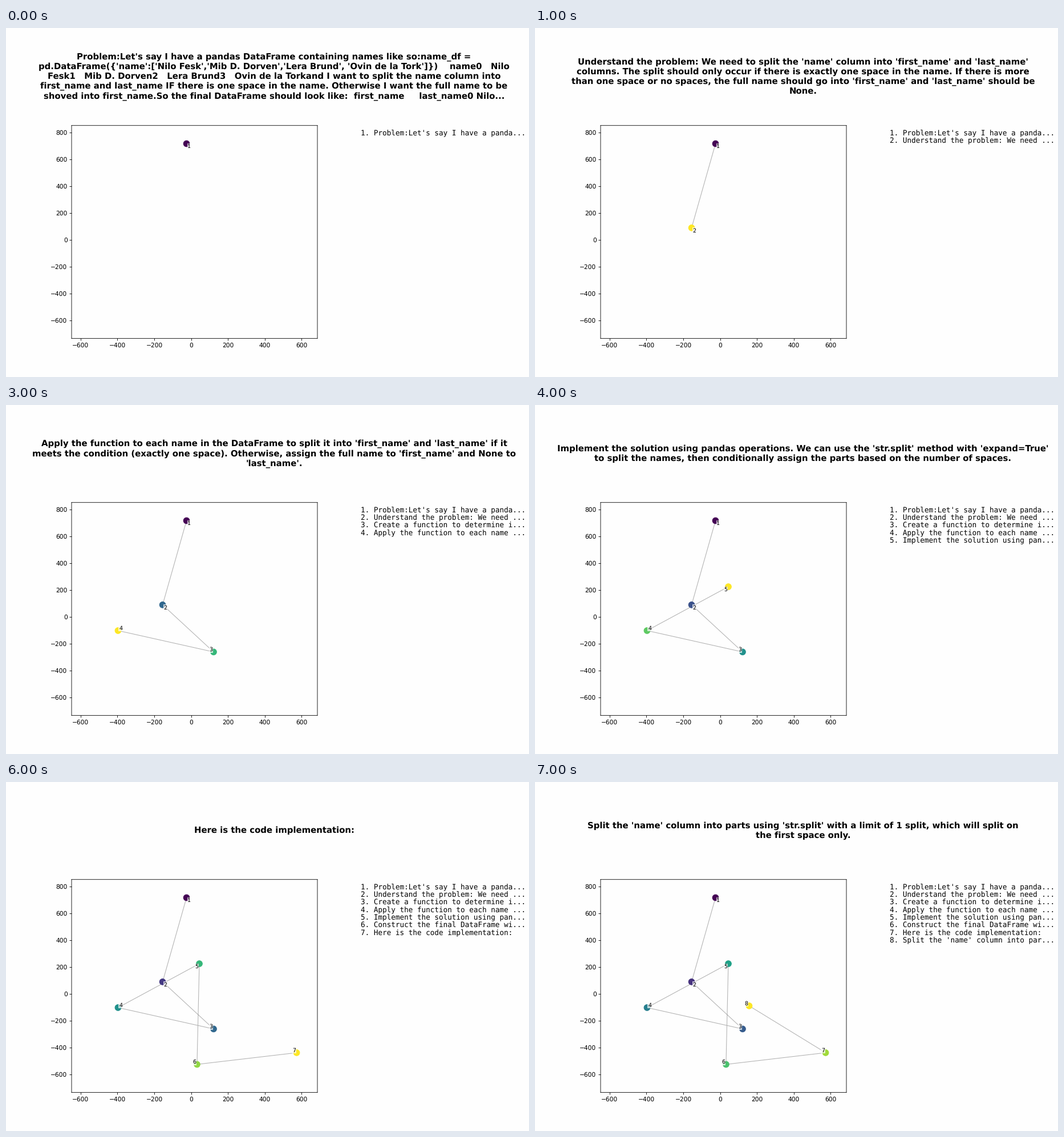
Recreate the animation shown at these times as a matplotlib script. Size 917 by 611 pixels, loop 8000 ms.

```python
import numpy as np
import matplotlib.pyplot as plt
from matplotlib.animation import FuncAnimation

W, H, DPI = 917, 611, 76.375
K = 0.764            # title layout unit in pixels
LEFT, RIGHT, TOP, BOTTOM = 115, 546, 170.7, 543.4
TITLE_X, TITLE_Y = 470, 85.15
LIST_X, LIST_Y, LIST_STEP = 622, 188, 13.33
PAPER = "#fefefe"

TITLES = [
    ["Problem:Let's say I have a pandas DataFrame containing names like so:name_df =",
     "pd.DataFrame({'name':['Nilo Fesk','Mib D. Dorven','Lera Brund', 'Ovin de la Tork']})"
     "    name0   Nilo",
     "Fesk1   Mib D. Dorven2   Lera Brund3   Ovin de la Torkand I want to split the name column into",
     "first_name and last_name IF there is one space in the name. Otherwise I want the full name to be",
     "shoved into first_name.So the final DataFrame should look like:  first_name     last_name0 Nilo..."],
    ["Understand the problem: We need to split the 'name' column into 'first_name' and 'last_name'",
     "columns. The split should only occur if there is exactly one space in the name. If there is more",
     "than one space or no spaces, the full name should go into 'first_name' and 'last_name' should be",
     "None."],
    ["Create a function to determine if a name contains exactly one space. If so, split the name into its",
     "first and last parts. Otherwise, keep the full name."],
    ["Apply the function to each name in the DataFrame to split it into 'first_name' and 'last_name' if it",
     "meets the condition (exactly one space). Otherwise, assign the full name to 'first_name' and None to",
     "'last_name'."],
    ["Implement the solution using pandas operations. We can use the 'str.split' method with 'expand=True'",
     "to split the names, then conditionally assign the parts based on the number of spaces."],
    ["Construct the final DataFrame with 'first_name' and 'last_name' columns as specified."],
    ["Here is the code implementation:"],
    ["Split the 'name' column into parts using 'str.split' with a limit of 1 split, which will split on",
     "the first space only."],
]

POINTS = np.array([(-25, 717), (-155, 90), (122, -261), (-397, -102),
                   (44.6, 225), (32, -525), (573, -438), (157.7, -89)])
# label side of each point: right/left, up/down
SIDES = [(1, -1), (1, -1), (-1, 1), (1, 1), (-1, -1), (-1, 1), (-1, 1), (-1, 1)]

plt.rcParams["font.family"] = "DejaVu Sans"
plt.rcParams["text.hinting"] = "no_hinting"
fig = plt.figure(figsize=(12.00655, 8), dpi=DPI, facecolor=PAPER)
ax = fig.add_axes([LEFT / W, 1 - BOTTOM / H, (RIGHT - LEFT) / W, (BOTTOM - TOP) / H],
                  facecolor=PAPER)
ax.set(xlim=(-649.3, 685.9), ylim=(-733.6, 852.3),
       xticks=range(-600, 601, 200), yticks=range(-600, 801, 200))
for spine in ax.spines.values():
    spine.set_snap(False)

path, = ax.plot([], [], color="black", alpha=0.3, lw=1, zorder=1)
dots = ax.scatter(*POINTS.T, s=100, zorder=2)


def put_text(x, y, text="", **style):
    return fig.text(x / W, 1 - y / H, text, va="baseline", **style)


def make_label(i):
    dx, dy = SIDES[i]
    drop = 1.4 if dy > 0 else -7.9
    return ax.annotate(str(i + 1), POINTS[i], xytext=(4.7 * dx, drop),
                       textcoords="offset pixels", ha="center", va="baseline",
                       fontsize=9, zorder=3,
                       bbox=dict(facecolor="white", alpha=0.7, edgecolor="none", pad=0.6))


def summary(i):
    text = TITLES[i][0]
    short = text if len(text) <= 32 else text[:32] + "..."
    return f"{i + 1}. {short}"


labels = [make_label(i) for i in range(len(POINTS))]
items = [put_text(LIST_X, LIST_Y + LIST_STEP * i, summary(i), fontsize=11.96,
                  family="DejaVu Sans Mono") for i in range(len(TITLES))]
title = [put_text(TITLE_X, TITLE_Y, ha="center", fontsize=14, weight="bold")
         for _ in range(5)]


def descent(line):
    return 5 if "_" in line else 4


def set_title(lines):
    """Centre the block of lines vertically; underscores hang lower."""
    base = [15]
    for line in lines[:-1]:
        base.append(base[-1] + 18 + descent(line))
    height = base[-1] + descent(lines[-1])
    for i, t in enumerate(title):
        t.set_visible(i < len(lines))
        if i < len(lines):
            t.set_text(lines[i])
            t.set_y(1 - (TITLE_Y + K * (base[i] - height / 2)) / H)


def update(step):
    n = step + 1
    set_title(TITLES[step])
    path.set_data(POINTS[:n, 0], POINTS[:n, 1])
    colors = np.zeros((len(POINTS), 4))     # later points stay transparent
    colors[:n] = plt.cm.viridis(np.linspace(0, 1, n))
    dots.set_facecolor(colors)
    dots.set_edgecolor(colors)
    for i in range(len(POINTS)):
        labels[i].set_visible(i < n)
        items[i].set_visible(i < n)
    return [path, dots, *labels, *items, *title]


anim = FuncAnimation(fig, update, frames=len(TITLES), interval=1000,
                     init_func=lambda: update(0), repeat=True, blit=False)
plt.show()
```
